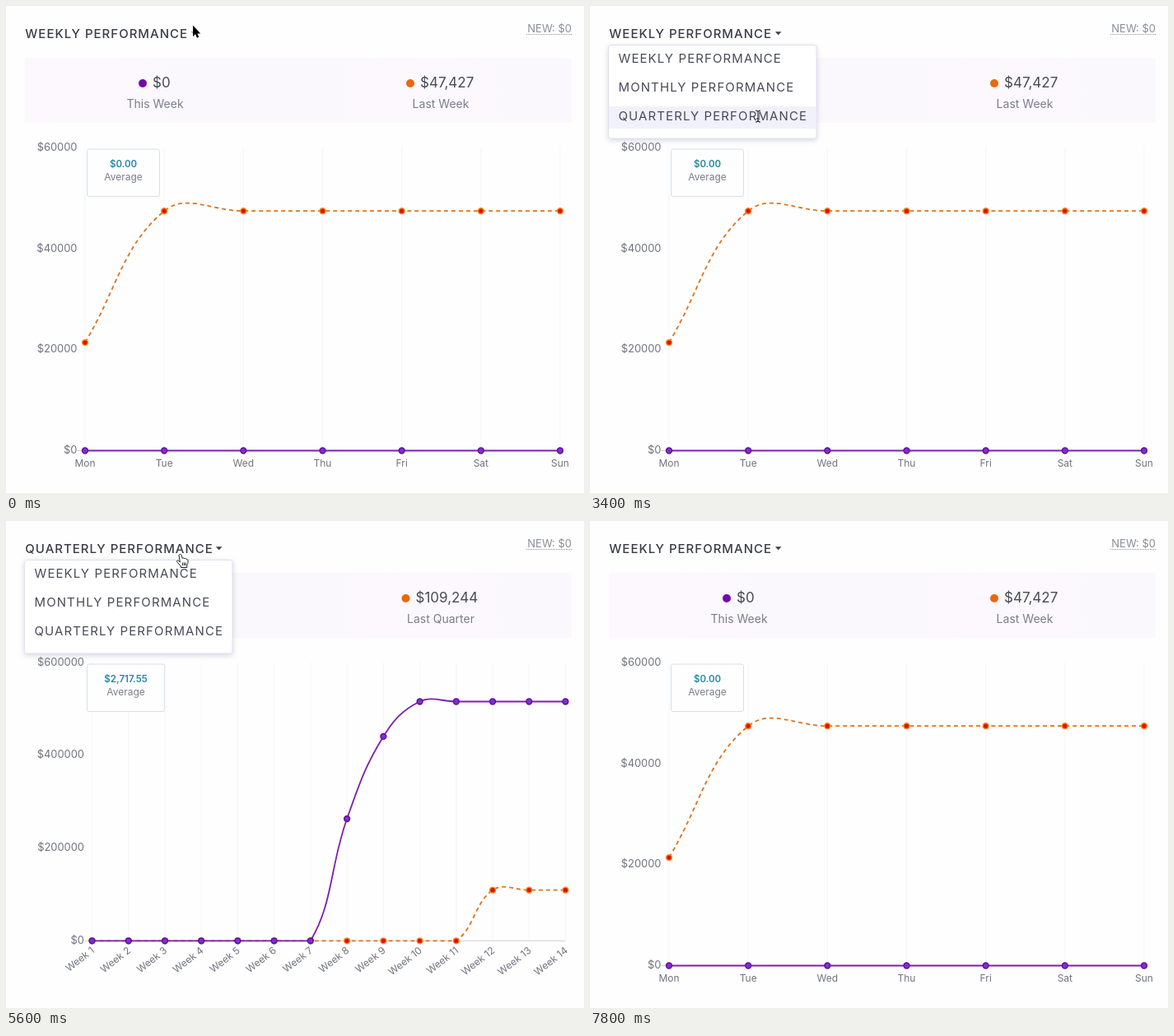
An HTML page for the animation above (8000 ms loop, 702 px wide and 592 px high).

```html
<!DOCTYPE html>
<html lang="en">
<head>
<meta charset="utf-8">
<title>Performance chart</title>
<style>
  html, body { margin: 0; width: 100%; height: 100%; overflow: hidden; background: #fefefe; }
  svg { display: block; width: 702px; height: 592px; font-family: Inter, "Open Sans", sans-serif; }
  .title { font-size: 15px; font-weight: 500; letter-spacing: 1px; fill: #3a3c49; }
  .item { font-size: 15px; letter-spacing: 1.1px; fill: #484a59; }
  .total { font-size: 17px; fill: #484a57; }
  .caption { font-size: 14px; fill: #7b7d8a; text-anchor: middle; }
  .value { font-size: 11.5px; font-weight: 600; fill: #2488a5; text-anchor: middle; }
  .average { font-size: 12px; fill: #7b7d8a; text-anchor: middle; }
  .axis { font-size: 12.9px; fill: #71737f; text-anchor: end; }
  .tick { font-size: 12px; fill: #71737f; text-anchor: middle; }
  .new { font-size: 13px; fill: #8c8e99; text-anchor: end; }
  .menu { filter: drop-shadow(0 2px 3px rgba(70, 75, 130, .22)); }
</style>
</head>
<body>
<svg id="stage" viewBox="0 0 702 592">
  <defs>
    <linearGradient id="band">
      <stop offset="0" stop-color="#fdf8fd"/>
      <stop offset=".4" stop-color="#faf8fd"/>
      <stop offset=".75" stop-color="#fcf8fd"/>
      <stop offset="1" stop-color="#faf8fd"/>
    </linearGradient>
  </defs>
  <rect width="702" height="592" fill="#fefefe"/>
  <text class="new" x="687" y="32.3">NEW: $0</text>
  <path d="M632 34.5H687" stroke="#8c8e99" stroke-dasharray="1 1"/>
  <rect x="23" y="63" width="664" height="79" fill="url(#band)"/>
  <g id="views"></g>
  <g id="menu">
    <rect class="menu" x="22.5" y="47.5" width="252.5" height="113.5" rx="2.5" fill="#fff" stroke="#e0e1ee"/>
    <rect id="hover" x="23" width="251.5" height="27" fill="#f0f1fa"/>
  </g>
  <g id="cursor">
    <path id="arrow" d="M0 0V13.5L3 10.7L5 15.3L7.3 14.3L5.3 9.9H9.3Z" fill="#000" stroke="#fff" stroke-width="1.2" paint-order="stroke"/>
    <path id="hand" d="M-2 1.5C-2-.4 .8-.6 1.2 1.2L2.2 5C2.8 4 4.6 4.2 4.9 5.4C5.6 4.6 7 5 7.3 6.2C8.2 5.7 9.2 6.4 9 7.6C9.2 10 8.8 12 7.8 13.5V16H.5V14.5L-4.5 9C-5 7.8-3.4 7-2.4 8L-.6 9.4ZM2.6 10V13.5M4.5 10V13.5M6.3 10V13.5" fill="#fff" stroke="#222"/>
    <g id="beam" fill="none">
      <path d="M-3-7Q0-7 0-5V5Q0 7-3 7M3-7Q0-7 0-5M0 5Q0 7 3 7M-2 3H2" stroke="#fff" stroke-width="2.6"/>
      <path d="M-3-7Q0-7 0-5V5Q0 7-3 7M3-7Q0-7 0-5M0 5Q0 7 3 7M-2 3H2" stroke="#222" stroke-width="1.1"/>
    </g>
  </g>
</svg>
<script>
const LOOP = 8000, STEP = 200, TOP = 172;
const $ = id => document.getElementById(id);

function add(parent, tag, attrs, text) {
  const el = document.createElementNS("http://www.w3.org/2000/svg", tag);
  for (const key in attrs) el.setAttribute(key, attrs[key]);
  if (text) el.textContent = text;
  parent.appendChild(el);
  return el;
}
const label = (parent, cls, x, y, text) => add(parent, "text", { class: cls, x, y }, text);

// Cubic spline with tension 0.4, weighted by segment lengths; handles stay inside the plot.
function spline(pts, base) {
  const clamp = y => Math.max(TOP, Math.min(base, y));
  const handles = pts.map((p, i) => {
    const a = pts[i - 1] || p, b = pts[i + 1] || p;
    const before = Math.hypot(p[0] - a[0], p[1] - a[1]);
    const after = Math.hypot(b[0] - p[0], b[1] - p[1]);
    const at = k => [p[0] + k * (b[0] - a[0]), clamp(p[1] + k * (b[1] - a[1]))];
    const unit = 0.4 / (before + after);
    return { back: at(-unit * before), ahead: at(unit * after) };
  });
  return pts.map((p, i) => i
    ? `C${handles[i - 1].ahead} ${handles[i].back} ${p}`
    : `M${p}`).join("");
}

function drawSeries(g, view, values, style) {
  const pts = values.map((v, i) => [
    view.left + i * (view.right - view.left) / (values.length - 1),
    view.base - v / view.max * (view.base - TOP)
  ]);
  add(g, "path", { d: spline(pts, view.base), fill: "none", stroke: style.line,
    "stroke-width": 1.8, "stroke-dasharray": style.dash });
  for (const [cx, cy] of pts)
    add(g, "circle", { cx, cy, r: 3.4, fill: style.fill, stroke: style.edge, "stroke-width": 1.5 });
}

const PURPLE = { line: "#7a20ad", fill: "#7a30d0", edge: "#690c9c", dash: "none" };
const ORANGE = { line: "#dc7420", fill: "#e60d05", edge: "#f58a24", dash: "5 4" };
const fill = (n, v) => Array(n).fill(v);

const weekly = {
  name: "WEEKLY PERFORMANCE", caret: 228.7, period: "Week",
  left: 96, right: 673, base: 540.5, max: 60000, axisX: 86.5, box: 88.5, average: "$0.00",
  ticks: ["Mon", "Tue", "Wed", "Thu", "Fri", "Sat", "Sun"],
  current: fill(7, 0), previous: [21400, ...fill(6, 47427)],
  totals: [["$0", 166], ["$47,427", 491]]
};
const quarterly = {
  name: "QUARTERLY PERFORMANCE", caret: 258.7, period: "Quarter",
  left: 104.5, right: 679.5, base: 510.3, max: 600000, axisX: 95, box: 94.5, average: "$2,717.55",
  ticks: Array.from({ length: 14 }, (_, i) => "Week " + (i + 1)), slanted: true,
  current: [...fill(7, 0), 263000, 440500, ...fill(5, 515795)],
  previous: [...fill(11, 0), ...fill(3, 109244)],
  totals: [["$515,795", 140.5], ["$109,244", 485.5]]
};

function drawView(view) {
  const g = add($("views"), "g", {});
  label(g, "title", 23.3, 39, view.name);
  add(g, "path", { d: `M${view.caret - 3.8} 31.2h7.6l-3.8 4z`, fill: "#3a3c49" });

  view.totals.forEach(([sum, x], i) => {
    add(g, "circle", { cx: x, cy: 94, r: 5, fill: i ? "#ee660c" : "#7409aa" });
    label(g, "total", x + 12, 99.4, sum);
    label(g, "caption", i ? 528 : 181, 123.7, (i ? "Last " : "This ") + view.period);
  });

  const gap = (view.right - view.left) / (view.ticks.length - 1);
  view.ticks.forEach((text, i) => {
    const x = view.left + i * gap;
    add(g, "path", { d: `M${x} ${TOP}V${view.base}`, stroke: "#f5f5fa" });
    if (view.slanted)
      add(g, "text", { class: "tick", style: "text-anchor:end",
        transform: `translate(${x + 3.5} 523.5) rotate(-38)` }, text);
    else label(g, "tick", x, 560, text);
  });
  for (let i = 0; i < 4; i++) {
    const amount = i * 20000 * (view.max / 60000);
    label(g, "axis", view.axisX, view.base + 3.7 - i * (view.base - TOP) / 3, "$" + amount);
  }
  add(g, "path", { d: `M${view.left - 9} ${view.base}H${view.right}`, stroke: "#cfcfd4" });

  add(g, "rect", { x: 98.5, y: 174, width: view.box - .5, height: 57.5, rx: 2.5,
    fill: "#fefefe", stroke: "#d5e0e8" });
  const mid = 98.3 + view.box / 2;
  label(g, "value", mid, 195.5, view.average);
  label(g, "average", mid, 212.4, "Average");

  drawSeries(g, view, view.previous, ORANGE);
  drawSeries(g, view, view.current, PURPLE);
  return g;
}

const weekView = drawView(weekly), quarterView = drawView(quarterly);
[weekly.name, "MONTHLY PERFORMANCE", quarterly.name]
  .forEach((text, i) => label($("menu"), "item", 34.5, 69 + i * 35, text));

// Pointer stops: time, x, y
const PATH = [
  [0, 227, 23.5], [200, 227, 23.5], [1000, 209, 34.5], [1600, 209, 34.5],
  [2200, 207, 64], [2600, 205, 99], [3000, 204, 134], [4800, 204, 134],
  [5400, 212, 40.5], [5800, 212, 40.5], [6200, 198, 61], [LOOP, 198, 61]
];
function pointerAt(t) {
  const i = PATH.findIndex(p => p[0] > t);
  const [t0, x0, y0] = PATH[i - 1], [t1, x1, y1] = PATH[i];
  const k = (t - t0) / (t1 - t0), e = k * k * (3 - 2 * k);
  return [x0 + (x1 - x0) * e, y0 + (y1 - y0) * e];
}
const within = (t, from, to) => t >= from && t < to;
const show = (el, on) => { el.style.display = on ? "" : "none"; };

function render(now) {
  const t = Math.floor(now % LOOP / STEP) * STEP;
  const quarter = within(t, 3600, 6400);
  const open = within(t, 1400, 3600) || within(t, 5600, 6400);
  const [x, y] = pointerAt(t);
  const overMenu = open && y > 50;
  const overTitle = y > 26 && y < 47;

  show(weekView, !quarter);
  show(quarterView, quarter);
  show($("menu"), open);
  show($("hover"), overMenu);
  if (overMenu) $("hover").setAttribute("y", 52 + 35 * Math.floor((y - 47) / 35));

  show($("cursor"), t < 7400);
  $("cursor").setAttribute("transform", `translate(${x} ${y})`);
  show($("beam"), overMenu);
  show($("hand"), overTitle);
  show($("arrow"), !overMenu && !overTitle);
}

const start = performance.now();
function tick() {
  render(performance.now() - start);
  requestAnimationFrame(tick);
}
tick();
</script>
</body>
</html>
```
